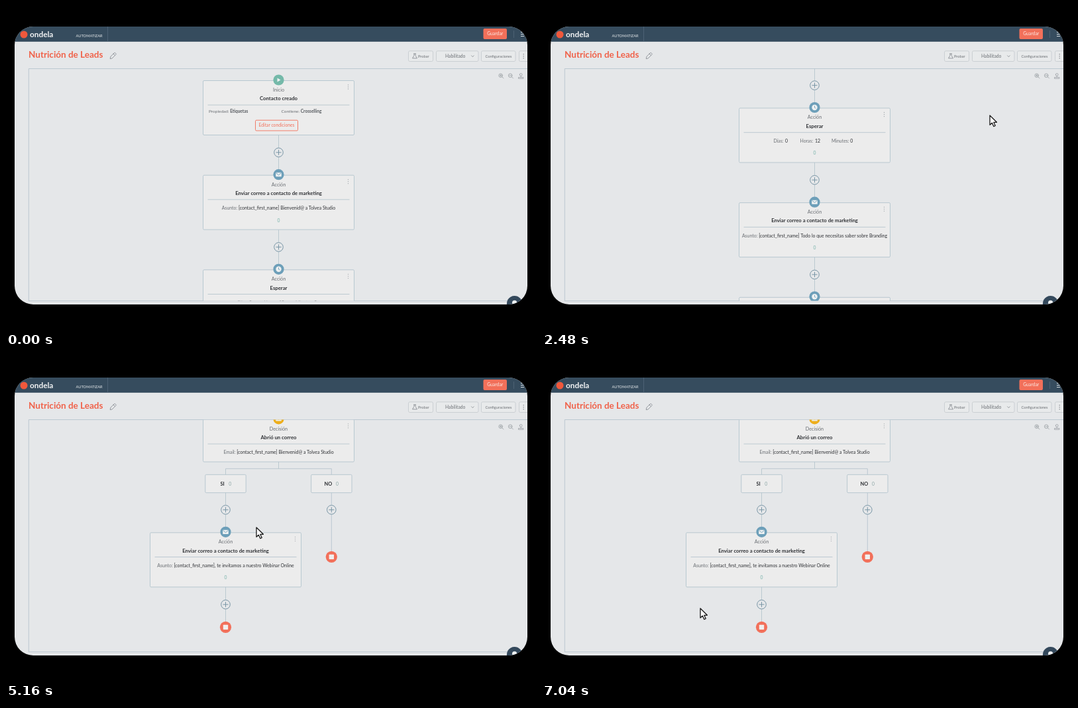
These frames come from a looping animation (800x487 px, 7.08 s). An HTML page:

```html
<!DOCTYPE html>
<html lang="es">
<head>
<meta charset="utf-8">
<title>Nutrición de Leads</title>
<style>
  html, body { margin: 0; width: 100%; height: 100%; overflow: hidden; background: #000; }
  svg { display: block; width: 100vw; height: 100vh; font-family: Lato, sans-serif; }
  .line { fill: none; stroke: #b7c6ce; stroke-width: .9; }
  .card { fill: #ececec; stroke: #b3c5cd; stroke-width: .9; }
  .button { fill: #e8eaeb; stroke: #c5c9cd; stroke-width: .8; }
  .icon { fill: none; stroke: #80868c; stroke-width: .8; stroke-linejoin: round; stroke-linecap: round; }
  .white { fill: none; stroke: #eef1f2; stroke-width: .9; }
</style>
</head>
<body>
<svg viewBox="0 0 800 487">
  <defs>
    <clipPath id="panel"><rect x="13" y="31" width="774" height="419" rx="28"/></clipPath>
    <clipPath id="board"><rect x="34" y="94.5" width="753" height="350"/></clipPath>
  </defs>
  <g clip-path="url(#panel)">
    <rect x="13" y="31" width="774" height="419" fill="#e5e7e9"/>
    <g id="page"></g>
    <g clip-path="url(#board)"><g id="flow"></g></g>
    <g id="overlay"></g>
  </g>
  <path id="cursor" d="M0 0V14.3L3.3 11.2 5.8 16.6 8.2 15.5 5.8 10.3H10.4Z"
        fill="#fff" stroke="#181818" stroke-width="1.3" stroke-linejoin="round"/>
</svg>
<script>
const LOOP = 7080, STEP = 40, TICK = 121.9;
const ORANGE = '#f2705a', BLUE = '#6d9fb9', DARK = '#303236', GREY = '#6b6f74', TEAL = '#79b3ab';
const byId = id => document.getElementById(id);

const text = (x, y, size, color, content, anchor = 'start', weight = 400) =>
  `<text x="${x}" y="${y}" font-size="${size}" fill="${color}" text-anchor="${anchor}" font-weight="${weight}">${content}</text>`;
const middle = (x, y, size, color, content, weight) => text(x, y, size, color, content, 'middle', weight);
const rect = (x, y, w, h, attrs) => `<rect x="${x}" y="${y}" width="${w}" height="${h}" ${attrs}/>`;
const circle = (x, y, r, fill) => `<circle cx="${x}" cy="${y}" r="${r}" fill="${fill}"/>`;
const path = (d, cls = 'line') => `<path class="${cls}" d="${d}"/>`;
const dots = (x, y, color, gap = 3) => [0, 1, 2].map(i => circle(x, y + i * gap, .65, color)).join('');
const pair = (label, value) => `<tspan fill="${GREY}">${label}</tspan> ${value}`;

const glyphs = {
  play: (x, y) => `<path d="M${x - 2} ${y - 3}l5 3-5 3z" fill="#eef1f2"/>`,
  mail: (x, y, color) => rect(x - 4.3, y - 3, 8.6, 6.2, 'rx=".8" fill="#eef1f2"') +
    `<path d="M${x - 4} ${y - 2.5}l4 3.3 4-3.3" fill="none" stroke="${color}" stroke-width=".9"/>`,
  clock: (x, y, color) => circle(x, y, 4.2, '#eef1f2') +
    `<path d="M${x} ${y - 2.6}v2.8l1.8 1" fill="none" stroke="${color}" stroke-width=".9"/>`,
};

const plus = (x, y) =>
  `<circle cx="${x}" cy="${y}" r="6.8" fill="#e5e7e9" stroke="#7895a5" stroke-width="1"/>` +
  `<path d="M${x - 4} ${y}h8M${x} ${y - 4}v8" stroke="#7895a5" stroke-width="1"/>`;

const stop = (x, y) => circle(x, y, 8.6, ORANGE) + rect(x - 3.7, y - 3.7, 7.4, 7.4, 'rx=".8" fill="#f1efee"');

function card({ x = 411.5, y, h = 82, glyph, color = BLUE, kind = 'Acción', title, body, count = true }) {
  return rect(x - 114, y, 228, h, 'class="card" rx="1.5"') +
    circle(x, y - 1, 8.1, color) + glyphs[glyph](x, y - 1, color) +
    middle(x, y + 16.5, 7.2, GREY, kind) +
    middle(x, y + 29.7, 7.75, DARK, title, 700) +
    path(`M${x - 107} ${y + 36.7}h214`) +
    dots(x + 105, y + 6.5, '#a0a6ab') + body +
    (count ? middle(x, y + 70.5, 6.8, TEAL, '0') : '');
}

const subject = (x, y, label, value) => middle(x, y + 52, 6.93, DARK, pair(label, value));

// A wait time: label and number pairs at fixed columns.
const wait = (y, columns) => columns.map(([label, x, value, valueX]) =>
  text(x, y + 51.7, 6.9, GREY, label) + text(valueX, y + 51.7, 6.9, DARK, value)).join('');

function branch(x, y, label) {
  return rect(x - 30.7, y, 61.4, 27.3, 'class="card" rx="1.5"') +
    middle(x - 5, y + 16.2, 7.4, DARK, label, 700) +
    text(x + 6.7 - (label === 'SI' ? 2 : 0), y + 16.2, 6.8, '#8aa5a5', '0');
}

function buildFlow() {
  const mailTitle = 'Enviar correo a contacto de marketing';
  const [start, mail, pause, mail2, pause2, decision] = [0, 1, 2, 3, 4, 5].map(i => 112.5 + i * 142.65);
  const reply = decision + 170.5, yes = 331.5, no = 491.3;
  const welcome = '[contact_first_name] Bienvenid@ a Tolvea Studio';
  let out = path(`M411.5 ${start}V${decision + 74}M${yes} ${decision + 83}V${decision + 74}H${no}V${decision + 207}` +
    `M${yes} ${decision + 83}V${reply + 142}`);
  for (const y of [start, mail, pause, mail2, pause2]) out += plus(411.5, y + 108.3);

  out += card({ y: start, glyph: 'play', color: '#74b9a9', kind: 'Inicio', title: 'Contacto creado', count: false,
    body: text(306, start + 48.2, 6.5, GREY, `Propiedad: <tspan font-weight="700" fill="#55595e">Etiquetas</tspan>`) +
      text(415.5, start + 48.2, 6.5, GREY, `Contiene: <tspan font-weight="700" fill="#55595e">Crosselling</tspan>`) +
      rect(376.5, start + 59.7, 64, 15.8, `rx="1.5" fill="none" stroke="${ORANGE}" stroke-width=".9"`) +
      middle(408.5, start + 69.6, 6.75, ORANGE, 'Editar condiciones') });
  out += card({ y: mail, glyph: 'mail', title: mailTitle, body: subject(411.5, mail, 'Asunto:', welcome) });
  out += card({ y: pause, glyph: 'clock', title: 'Esperar',
    body: wait(pause, [['Días:', 349.5, 0, 367], ['Horas:', 389.5, 12, 412], ['Minutes:', 437, 0, 465.2]]) });
  out += card({ y: mail2, glyph: 'mail', title: mailTitle,
    body: subject(411.5, mail2, 'Asunto:', '[contact_first_name] Todo lo que necesitas saber sobre Branding') });
  out += card({ y: pause2, glyph: 'clock', title: 'Esperar',
    body: wait(pause2, [['Días:', 351.5, 2, 369], ['Horas:', 391.2, 0, 413.5], ['Minutes:', 435.5, 0, 463.5]]) });
  out += card({ y: decision, h: 63.7, glyph: 'mail', color: '#edae1c', kind: 'Decisión', title: 'Abrió un correo',
    body: subject(411.5, decision, 'Email:', welcome), count: false });

  out += branch(yes, decision + 83, 'SI') + branch(no, decision + 83, 'NO');
  out += plus(yes, decision + 136) + plus(no, decision + 136) + stop(no, decision + 207);
  out += card({ x: yes, y: reply, glyph: 'mail', title: mailTitle,
    body: subject(yes, reply, 'Asunto:', '[contact_first_name], te invitamos a nuestro Webinar Online') });
  return out + plus(yes, reply + 108.3) + stop(yes, reply + 142.5);
}

function buildPage() {
  const button = (x, w) => rect(x, 67.8, w, 15.7, 'class="button" rx="2"');
  return rect(13, 31, 774, 22.8, 'fill="#364c5e"') +
    path('M153.5 31v23M766.5 37v11', 'separator').replace('/>', ' stroke="#53687a" stroke-width=".8"/>') +
    circle(27, 43, 5.5, '#f0583c') +
    text(36, 46.8, 11.8, '#f4f5f6', 'ondela', 'start', 700) +
    text(105.5, 47, 5.7, '#e8ebed', 'AUTOMATIZAR') +
    rect(720.5, 34, 35.5, 16, `rx="2" fill="${ORANGE}"`) +
    middle(738.2, 44.2, 6.8, '#fbe9e5', 'Guardar') +
    path('M777 39.5h5M777 42.5h5M777 45.5h5', 'white') +
    text(34, 78, 13.5, '#f0624a', 'Nutrición de Leads', 'start', 700) +
    path('M157.3 79.2l.6-3 5.3-5.3q1-.8 1.9 0l.6.6q.8 1 0 1.9l-5.3 5.3zM162 72l2.5 2.5', 'icon') +
    button(607.5, 37) + button(649.5, 63.5) + button(717.5, 51.5) + button(774.5, 20) +
    path('M615.5 72h3M616 72v2.5l-2.5 4.3h7l-2.5-4.3V72', 'icon') +
    text(622, 78, 5.65, GREY, 'Probar') +
    text(663, 78.2, 6.75, GREY, 'Habilitado') +
    path('M702.6 74.8l1.8 1.8 1.8-1.8', 'icon') +
    text(723.6, 78, 5.65, GREY, 'Configuraciones') +
    dots(781.2, 72.7, '#666b70') +
    path('M787 94.5H34.3V444.7H787').replace('#b7c6ce', '#c8cdd2');
}

function buildOverlay() {
  const lens = x => `M${x + 2.5} 104.8a2.8 2.8 0 1 0-5.6 0a2.8 2.8 0 1 0 5.6 0m-.7 2l2.2 2.2M${x - 1.7} 104.8h3`;
  return `<g opacity=".75">` + path(lens(747) + 'M746.8 103.3v3' + lens(761.5), 'icon') +
    path('M775.3 103.5a1.9 1.9 0 1 0 3.8 0a1.9 1.9 0 1 0-3.8 0M777.2 105.5v2M773.5 109v-1.5h7.4v1.5z', 'icon') + '</g>' +
    circle(767.6, 448.7, 11.7, '#34495c') + circle(767.6, 447.3, 3.6, '#edf0f1');
}

const scrollTimes = [1080, 2480, 3040, 4040, 4880, 4960];
const cursorPath = [
  [360, 757, 100], [840, 676, 165], [4720, 676, 165], [4760, 578, 177], [4960, 378, 257],
  [6160, 378, 257], [6500, 479, 285], [6880, 270, 335], [7040, 239, 379], [LOOP, 239, 379],
];

function cursorAt(t) {
  const i = cursorPath.findIndex(([end]) => t < end);
  const [t0, x0, y0] = cursorPath[i - 1], [t1, x1, y1] = cursorPath[i];
  const k = (t - t0) / (t1 - t0);
  return [x0 + (x1 - x0) * k, y0 + (y1 - y0) * k];
}

function render(now) {
  const t = Math.floor((now % LOOP) / STEP) * STEP;
  const scroll = scrollTimes.filter(time => t >= time).length * TICK;
  byId('flow').setAttribute('transform', `translate(0 ${-scroll})`);
  const visible = t >= cursorPath[0][0];
  byId('cursor').style.display = visible ? '' : 'none';
  if (visible) byId('cursor').setAttribute('transform', `translate(${cursorAt(t)})`);
}

byId('page').innerHTML = buildPage();
byId('flow').innerHTML = buildFlow();
byId('overlay').innerHTML = buildOverlay();

const startTime = performance.now();
function frame() {
  render(performance.now() - startTime);
  requestAnimationFrame(frame);
}
frame();
</script>
</body>
</html>
```
